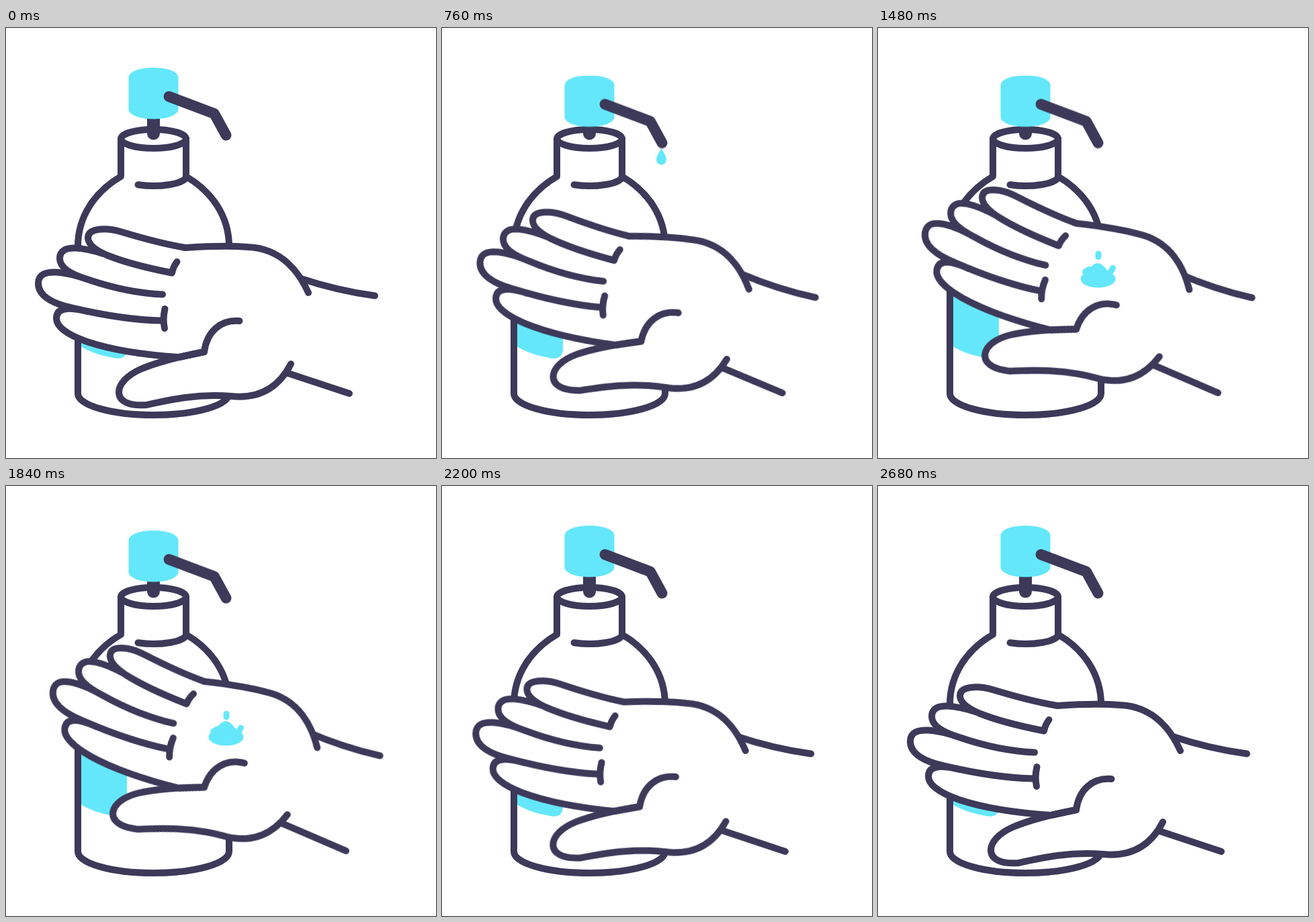
Animation, 640 px wide and 640 px high, one loop 4.04 s. Source, as an HTML page without scripts:

```html
<!DOCTYPE html>
<html lang="en">
<head>
<meta charset="utf-8">
<title>Hand sanitizer</title>
<style>
  :root { --ink: #3d3959; --gel: #64e7fa; --ease: cubic-bezier(.33, 0, .67, 1); }
  html, body { margin: 0; width: 100%; height: 100%; overflow: hidden; background: #fff; }
  svg { display: block; width: 100%; height: 100%; }

  .line { fill: none; stroke: var(--ink); stroke-width: 10; stroke-linecap: round; stroke-linejoin: round; }
  .solid { fill: #fff; }
  .gel { fill: var(--gel); }
  .blob { fill: none; stroke: var(--gel); stroke-width: 9; stroke-linecap: round; }
  .stem { stroke-width: 19; }
  .spout { stroke-width: 16; }

  .pump, .arm, .hand, .drop, .splash, .bit { animation: 4.04s var(--ease) infinite; }
  .pump { animation-name: press; }
  .arm { animation-name: lift; transform-origin: 519px 487px; }
  .hand { animation-name: tilt; transform-origin: 445px 448px; }
  .drop { animation-name: drip; transform-origin: 326.5px 185px; }
  .splash { animation-name: spread; transform-origin: 327.5px 382px; }
  .up { animation-name: hop; }
  .side { animation-name: skip; }

  @keyframes press {
    0%, .5% { transform: none; }
    9.9%, 42.08% { transform: translateY(11.5px); }
    50.5%, 100% { transform: none; }
  }
  @keyframes lift {
    0%, 9.9% { transform: rotate(0deg); }
    21.29%, 45.05% { transform: rotate(5.05deg); }
    55.45%, 100% { transform: rotate(0deg); }
  }
  /* the hand lags behind the arm on the way up and overshoots on the way down */
  @keyframes tilt {
    0%, 10.4% { transform: rotate(0deg); }
    17.33% { transform: rotate(-1deg); }
    27.72%, 49% { transform: rotate(5.25deg); }
    58.9% { transform: rotate(-1deg); }
    66.34%, 100% { transform: rotate(0deg); }
  }
  @keyframes drip {
    0%, 14.6% { transform: translateY(-9px) scale(0); animation-timing-function: linear; }
    18.81% { transform: translateY(-7px) scale(.51); animation-timing-function: ease-out; }
    26.73% { transform: none; animation-timing-function: linear; }
    27.72% { transform: translateY(1px); animation-timing-function: cubic-bezier(.5, 0, .9, .7); }
    33.66% { transform: translateY(140px); animation-timing-function: linear; }
    34.65%, 100% { transform: translateY(192px) scale(1.2, 0); }
  }
  @keyframes spread {
    0%, 33.66% { transform: scale(0); }
    36.14%, 45.54% { transform: none; }
    49.5%, 100% { transform: scale(0); }
  }
  @keyframes hop {
    0%, 34.65% { transform: translateY(26px); animation-timing-function: ease-out; }
    39.6% { transform: translateY(-24px); animation-timing-function: ease-in; }
    45.54% { transform: none; }
    48%, 100% { transform: translateY(26px); }
  }
  @keyframes skip {
    0%, 34.65% { transform: translateY(10px); animation-timing-function: ease-out; }
    39.6% { transform: translateY(-12px); animation-timing-function: ease-in; }
    45.54% { transform: none; }
    48%, 100% { transform: translateY(10px); }
  }
</style>
</head>
<body>
<svg viewBox="0 0 640 640">
  <g class="bottle">
    <path class="gel" d="M108 372H180V476Q180 494 163 491.500C143 488 125 483 110 473Z"/>
    <path class="line" d="M171 165V221C133 243 107 280 107 325V544A112.500 32 0 0 0 332 544V325C332 280 306 243 268 221V165"/>
    <path class="line" d="M268 221A48.500 14 0 0 1 196.500 233.300"/>
    <ellipse class="line" cx="219.500" cy="165" rx="48.500" ry="14"/>
    <path class="line stem" d="M219.500 122V157"/>
  </g>

  <g class="pump">
    <path class="gel" d="M182.500 73A37 14 0 0 1 256.500 73V121.500A37 14 0 0 1 182.500 121.500Z"/>
    <path class="line spout" d="M242.500 102L310 127.500L327.500 159.500"/>
  </g>

  <g class="arm">
    <path class="line" d="M436 372C475 385 515 394 549 398.500M405 509L511 544"/>
    <g class="hand">
      <path class="solid" d="M130 318L267 330L450 394L424 500L335 546L295 482L258 490L104 430L70 385Z"/>
      <path class="line solid" d="
        M450 394C437 365 411 328 360 326C330 323.500 295 325 267 327C232 321 200 312 172 303.500
        C150 297 122 297 122 312C122 322 134 331 150 338C177 349 214 358 247 364.500Q249 355 254.500 348
        M148 337C120 328 80 319 80 343C80 357 98 367 121 374C156 386 198 395 233 396.500
        M121 374C95 365 48 353 48 380C48 398 68 410 100 417C143 427 190 435 233 435.500
        M122 422C100 417 75 413 75 432C75 445 92 457 121 467C160 480 212 487 258 490
        M295 482C258 489 228 496 200 508C180 517 168 530 168 542C168 556 184 563 209 561
        C245 553 285 544 335 548C373 552 404 539 424 500"/>
      <path class="line" d="M236.500 418Q233 433 236 447M258 490L295 482C299 452 319 434 347.500 436"/>
    </g>
  </g>

  <path class="gel drop" d="M326.500 185C331 198 341 208 341 220A14.500 14.500 0 0 1 312 220C312 208 322 198 326.500 185Z"/>

  <g class="splash">
    <ellipse class="gel" cx="327.500" cy="373.500" rx="26" ry="13"/>
    <path class="gel" d="M304 371C312 364 318 350 327 350S342 364 351 371Z"/>
    <path class="blob bit up" d="M328 339V343.500"/>
    <path class="blob bit side" d="M349.500 360L346 366M308.500 365.500L314 362"/>
  </g>
</svg>
</body>
</html>
```
